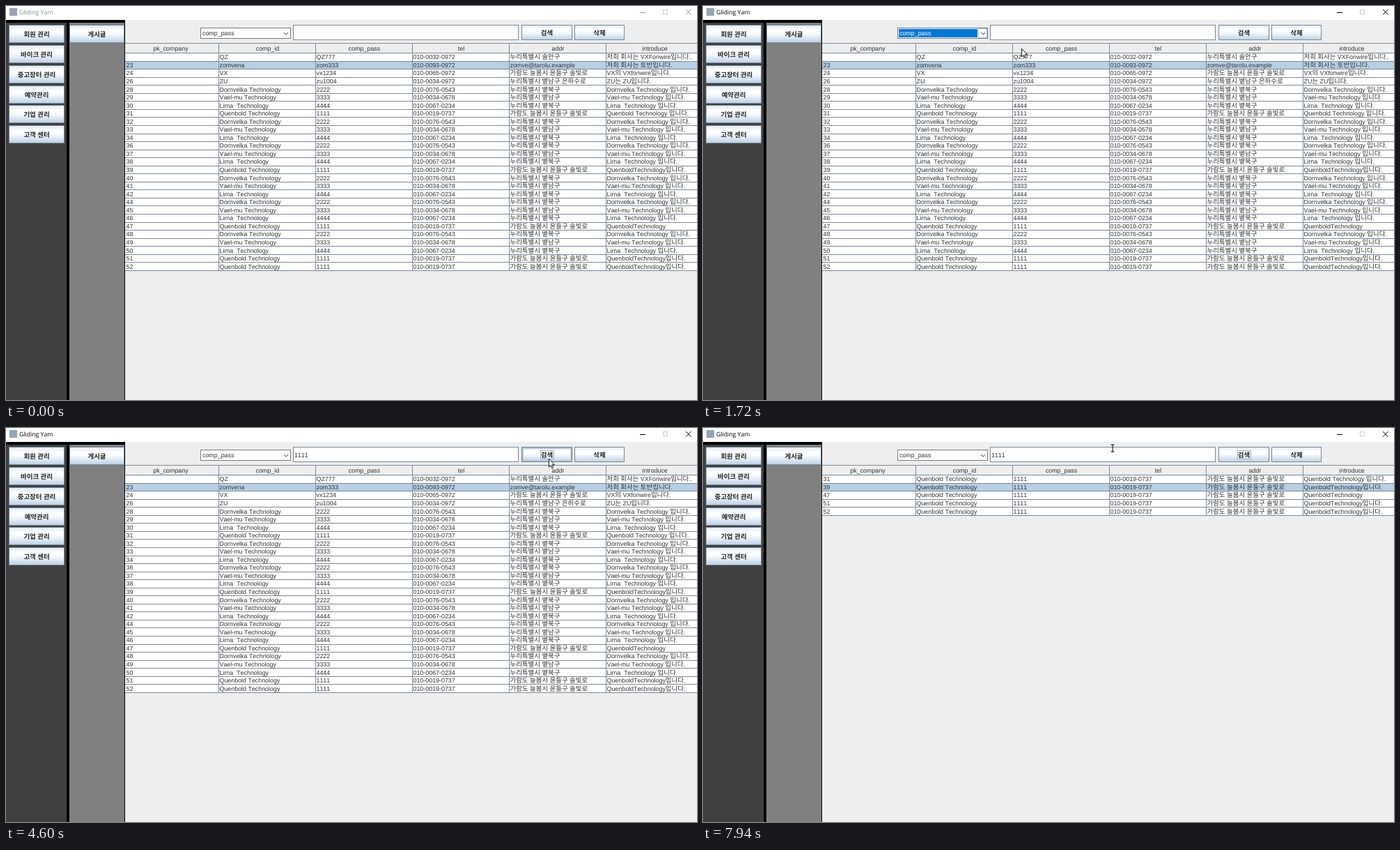
An HTML page with a canvas for the animation above (8000 ms loop, 992 by 565 pixels).

```html
<!DOCTYPE html>
<html lang="ko">
<head>
<meta charset="utf-8">
<style>
html, body { margin: 0; width: 992px; height: 565px; overflow: hidden; background: #eee; }
canvas { display: block; }
</style>
</head>
<body>
<canvas id="stage" width="992" height="565"></canvas>
<script>
const ctx = document.getElementById('stage').getContext('2d', { alpha: false });
ctx.textRendering = 'geometricPrecision';
ctx.fontKerning = 'none';

const LOOP = 8000, EDGE = '#7a8a99', PALE = '#b8cfe5', BLUE = '#0078d7', INK = '#333';
const SANS = '"Liberation Sans", Arial, sans-serif';
const KOREAN = '"Noto Sans CJK KR", "Noto Sans CJK", "Noto Sans CJK JP", sans-serif';
const ROW = 11.55, TOP = 67, LEFT = 171, WIDE = 992 - LEFT;
const COLS = [LEFT, 305, 444, 583, 722, 861];
const FIELDS = ['pk_company', 'comp_id', 'comp_pass', 'tel', 'addr', 'introduce'];
const ITEMS = ['select', ...FIELDS];
const MENU = ['회원 관리', '바이크 관리', '중고장터 관리', '예약관리', '기업 관리', '고객 센터'];

// Table data
const CITY = '누리특별시 ';
const FIRMS = {
  S: ['Dornvelka Technology', '2222', '010-0076-0543', CITY + '볕북구'],
  H: ['Vael-mu Technology', '3333', '010-0034-0678', CITY + '볕남구'],
  J: ['Lirna  Technology', '4444', '010-0067-0234', CITY + '볕북구'],
  T: ['Quenbold Technology', '1111', '010-0019-0737', '가람도 늘봄시 윤들구 솔빛로']
};
const rows = [
  ['', 'QZ', 'QZ777', '010-0032-0972', CITY + '솔안구', '저희 회사는 VXFonwire입니다..'],
  ['23', 'zomvena', 'zom333', '010-0093-0972', 'zomve@tarolu.example', '저희 회사는 토반입니다.'],
  ['24', 'VX', 'vx1234', '010-0065-0972', FIRMS.T[3], 'VX의 VXfonwire입니다.'],
  ['26', 'ZU', 'zu1004', '010-0034-0972', CITY + '볕남구 은하수로', 'ZU는 ZU입니다.']
];
let id = 28;
for (const key of 'SHJTSHJSHJTSHJSHJTSHJTT') {
  if (id === 35 || id === 43) id++;
  const firm = FIRMS[key];
  let intro = firm[0] + ' 입니다.';
  if (key === 'T' && id > 31) intro = 'QuenboldTechnology' + (id === 47 ? '' : '입니다.');
  rows.push([String(id++), ...firm, intro]);
}
const found = rows.filter(r => r[2] === '1111');

// Pointer path: time, x, y
const PATH = [
  [70, 400, 487], [350, 396, 260], [600, 387, 60], [740, 385, 43], [890, 385, 44],
  [1170, 376, 85], [1400, 376, 85], [1720, 457, 61], [1960, 492, 47], [2200, 506, 40],
  [2270, 508, 40], [2690, 525, 45], [2990, 525, 45], [3250, 570, 50], [3650, 715, 54],
  [3790, 744, 55], [3860, 752, 49], [4140, 777, 45], [4400, 779, 44], [5720, 779, 44],
  [5730, 780, 44], [6450, 780, 44], [6500, 781, 44], [6850, 796, 38], [7190, 790, 33],
  [7430, 790, 33], [7660, 788, 32], [7730, 755, 31], [7800, 690, 30], [7870, 620, 30],
  [7940, 588, 29]
];

function pointerAt(t) {
  const i = PATH.findIndex(p => p[0] > t);
  if (i < 0) return PATH[PATH.length - 1].slice(1);
  const [t0, x0, y0] = PATH[i - 1], [t1, x1, y1] = PATH[i];
  const k = (t - t0) / (t1 - t0);
  return [x0 + (x1 - x0) * k, y0 + (y1 - y0) * k];
}

const between = (t, a, b) => t >= a && t < b;

function box(x, y, w, h, fill) {
  ctx.fillStyle = fill;
  ctx.fillRect(x, y, w, h);
}

function frame(x, y, w, h, color) {
  ctx.strokeStyle = color;
  ctx.lineWidth = 1;
  ctx.strokeRect(x + .5, y + .5, w - 1, h - 1);
}

function lines(points, color) {
  ctx.strokeStyle = color;
  ctx.lineWidth = 1;
  ctx.beginPath();
  points.forEach(([x, y], i) => i ? ctx.lineTo(x, y) : ctx.moveTo(x, y));
  ctx.stroke();
}

// Hangul runs are set slightly larger than Latin ones
function text(str, x, y, { color = INK, center = false, bold = false } = {}) {
  const runs = str.split(/([가-힣]+)/).filter(Boolean).map(s => {
    const font = (bold ? 'bold ' : '') + (/[가-힣]/.test(s) ? '9.45px ' + KOREAN : '8.9px ' + SANS);
    ctx.font = font;
    return { s, font, w: ctx.measureText(s).width };
  });
  if (center) x -= runs.reduce((sum, r) => sum + r.w, 0) / 2;
  ctx.fillStyle = color;
  for (const r of runs) {
    ctx.font = r.font;
    ctx.fillText(r.s, x, y);
    x += r.w;
  }
}

function button(x, y, w, h, label, { hover, pressed, focus } = {}) {
  const g = ctx.createLinearGradient(0, y, 0, y + h);
  g.addColorStop(0, '#dde8f3');
  g.addColorStop(.3, '#fff');
  g.addColorStop(.5, '#f8fafd');
  g.addColorStop(1, PALE);
  box(x, y, w, h, pressed ? PALE : g);
  if (hover && !pressed) {
    frame(x + 1, y + 1, w - 2, h - 2, '#a3b8cc');
    frame(x + 2, y + 2, w - 4, h - 4, PALE);
  }
  frame(x, y, w, h, EDGE);
  const cx = x + w / 2, cy = y + h / 2;
  if (focus) frame(Math.round(cx) - 10, Math.round(cy) - 6, 20, 13, '#a3b8cc');
  text(label, cx, cy + 3.6, { center: true, bold: true, color: '#222' });
}

function titleBar(active) {
  box(0, 0, 992, 20, '#fff');
  box(5, 3, 11, 11, '#93a5b5');
  ctx.font = '8.7px "Open Sans", "Noto Sans", sans-serif';
  ctx.fillStyle = active ? '#000' : '#7d9c86';
  ctx.fillText('Gliding Yam', 19, 12);
  const ink = active ? '#000' : '#999';
  box(910, 9, 8, 1, ink);
  frame(943, 5, 7, 7, '#ccc');
  lines([[976, 5], [983.5, 12.5]], ink);
  lines([[983.5, 5], [976, 12.5]], ink);
}

function sidebar() {
  box(0, 20, LEFT, 545, '#000');
  box(0, 24, 87, 541, '#404040');
  box(91, 24, 79, 541, '#808080');
  MENU.forEach((label, i) => button(4, Math.round(27 + 28.85 * i), 80, 26, label));
  button(91, 27, 79, 26, '게시글');
}

function table(data) {
  const lineY = i => Math.round(TOP + ROW * i);
  const bottom = lineY(data.length);
  box(LEFT, TOP, WIDE, bottom - TOP, '#fff');
  box(LEFT, lineY(1), WIDE, lineY(2) - lineY(1), PALE);
  box(LEFT, 53, WIDE, 1, EDGE);
  for (let i = 0; i <= data.length; i++) box(LEFT, lineY(i), WIDE, 1, EDGE);
  for (const x of COLS.slice(1)) box(x, 53, 1, bottom - 53, EDGE);
  FIELDS.forEach((f, i) => text(f, i ? COLS[i] + 70.5 : 236.5, 64, { center: true }));
  data.forEach((row, i) => row.forEach((cell, c) =>
    text(cell, COLS[c] + 1.5, TOP + ROW * i + 9.3)));
}

function combo(focus) {
  box(279, 31, 130, 16, '#fff');
  frame(279, 31, 130, 16, '#7a7a7a');
  if (focus) {
    box(281, 33, 113, 12, BLUE);
    frame(395, 32, 13, 14, '#9fc4e4');
  }
  text('comp_pass', 282, 42, { color: focus ? '#fff' : INK });
  lines([[399, 38], [402, 41], [405, 38]], '#444');
}

function popup(opening, mouseY) {
  const step = 10.86, shift = opening ? -4.7 : 0, end = opening ? 120 : 124;
  const hover = mouseY > 49 ? Math.floor((mouseY - 48) / step) : 3;
  const height = opening ? 66 : 77;
  ctx.save();
  box(284, end, 127, 2, 'rgba(0,0,0,.25)');
  box(409, 51, 2, end - 51, 'rgba(0,0,0,.25)');
  box(279, 47, 130, height, '#fff');
  if (opening) box(284, 113, 125, 2, '#fff');
  frame(279, 47, 130, height, '#777');
  ctx.beginPath();
  ctx.rect(280, 47, 128, height - 1);
  ctx.clip();
  ITEMS.forEach((item, i) => {
    const y = 48 + shift + i * step;
    if (i === hover) box(280, y, 128, step, BLUE);
    text(item, 281, y + 8.6, { color: i === hover ? '#fff' : INK });
  });
  ctx.restore();
}

function searchField(t) {
  box(412, 27, 324, 22, '#fff');
  frame(412, 27, 324, 22, EDGE);
  const typed = [2690, 3020, 3090, 3160].filter(k => t >= k).length;
  text('1'.repeat(typed), 414, 42);
  if (between(t, 2200, 4140)) box(414 + Math.round(typed * 4.95), 33, 1, 12, '#000');
}

function pointer(x, y) {
  if (between(x, 412, 736) && between(y, 28, 49)) {
    lines([[x - 2.5, y - 5], [x + 2.5, y - 5]], '#000');
    lines([[x, y - 5], [x, y + 5]], '#000');
    lines([[x - 2.5, y + 5], [x + 2.5, y + 5]], '#000');
    return;
  }
  ctx.save();
  ctx.translate(x, y);
  const p = new Path2D('M.4 .4V12L3 9.6L4.8 13.6L6.6 12.8L4.8 8.9L8.4 8.6Z');
  ctx.fillStyle = '#fff';
  ctx.strokeStyle = '#000';
  ctx.lineWidth = .9;
  ctx.fill(p);
  ctx.stroke(p);
  ctx.restore();
}

function draw(t) {
  const active = t >= 70;
  const [x, y] = active ? pointerAt(t) : [-50, -50];
  box(0, 0, 992, 565, '#eee');
  titleBar(active);
  sidebar();
  table(t < 7790 ? rows : found);
  combo(between(t, 890, 2130));
  searchField(t);
  button(740, 27, 73, 22, '검색', {
    hover: between(x, 740, 813) && between(y, 27, 49),
    pressed: between(t, 4400, 4600) || between(t, 5930, 6000) || between(t, 7600, 7730),
    focus: t >= 4400
  });
  button(816, 27, 72, 22, '삭제');
  if (between(t, 800, 1440)) popup(t < 890, y);
  if (active) pointer(x, y);
}

function tick() {
  draw(performance.now() % LOOP);
  requestAnimationFrame(tick);
}
tick();
</script>
</body>
</html>
```
